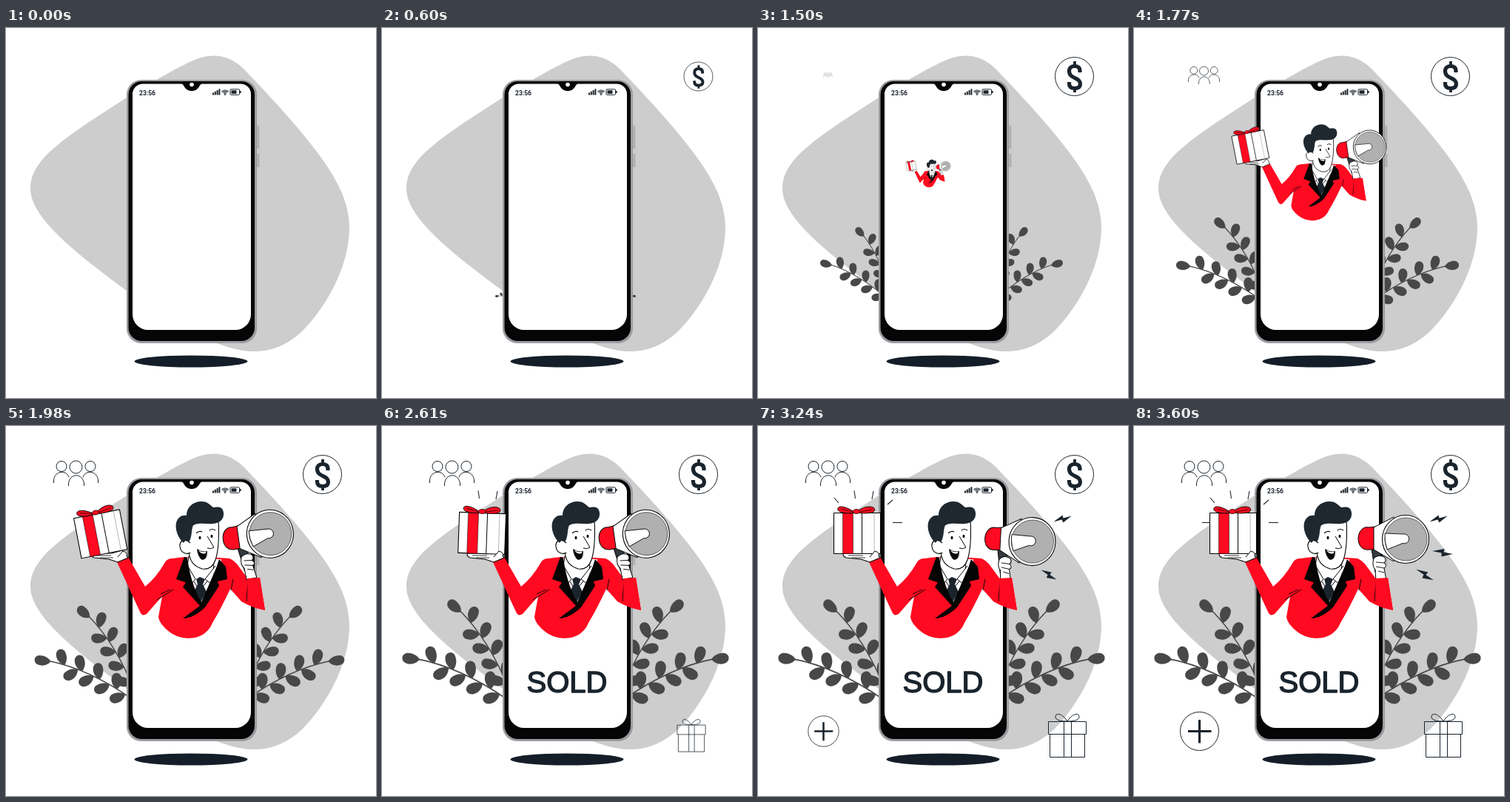
Recreate the animation shown at these times as an HTML page with a canvas. Size 500 px wide and 500 px high, loop 4.53 s.

```html
<!DOCTYPE html>
<html lang="en">
<head>
<meta charset="utf-8">
<title>Sold</title>
<style>
html, body { margin: 0; width: 100%; height: 100%; overflow: hidden; background: #fff; }
canvas { display: block; width: 500px; height: 500px; }
</style>
</head>
<body>
<canvas id="stage" width="500" height="500"></canvas>
<script>
const ctx = document.getElementById('stage').getContext('2d');
const LOOP = 4530, STEP = 30, FIRST = 210, LAST = 3600;
const INK = '#1a242d', BLACK = '#050505', HAIR = '#1f282f', RED = '#ff0a20', GREY = '#cdcdcd', LEAF = '#484848';

const ramp = (t, start, end) => Math.min(1, Math.max(0, (t - start) / (end - start)));
const ease = p => p * p * (3 - 2 * p);

// Eased value from [time, value] pairs.
function track(t, keys) {
  if (t <= keys[0][0]) return keys[0][1];
  for (let i = 1; i < keys.length; i++) {
    const [t0, v0] = keys[i - 1], [t1, v1] = keys[i];
    if (t <= t1) return v0 + (v1 - v0) * ease((t - t0) / (t1 - t0));
  }
  return keys[keys.length - 1][1];
}

function paint(d, fill, stroke, width = 1) {
  const p = d instanceof Path2D ? d : new Path2D(d);
  if (fill) { ctx.fillStyle = fill; ctx.fill(p); }
  if (stroke) { ctx.strokeStyle = stroke; ctx.lineWidth = width; ctx.stroke(p); }
}
function oval(x, y, rx, ry, fill, stroke, width) {
  const p = new Path2D();
  p.ellipse(x, y, rx, ry, 0, 0, Math.PI * 2);
  paint(p, fill, stroke, width);
}
function box(x, y, w, h, r, fill, stroke, width) {
  const p = new Path2D();
  p.roundRect(x, y, w, h, r);
  paint(p, fill, stroke, width);
}
function pivot(x, y, scale, degrees, draw) {
  if (scale <= 0) return;
  ctx.save();
  ctx.translate(x, y);
  ctx.rotate(degrees * Math.PI / 180);
  ctx.scale(scale, scale);
  ctx.translate(-x, -y);
  draw();
  ctx.restore();
}

function backdrop() {
  paint('M33 217C33 175 85 145 163 94C200 72 240 48 260 41C285 33 305 39 322 56C345 80 376 113 400 142' +
    'C436 186 464 225 464 270C464 325 430 380 400 410C375 434 345 441 315 435C275 427 220 396 163 355' +
    'C100 308 33 258 33 217Z', GREY);
  oval(250, 450.5, 76.5, 8, '#141e28');
}

function leaf(x, y, angle) {
  ctx.save();
  ctx.translate(x, y);
  ctx.rotate(angle);
  paint('M0 0C4 -6 11 -9 18 -7C25 -5 26 4 19 6.5C12 8 5 6 0 0Z', LEAF);
  ctx.restore();
}

// Grows to the left from the origin along a shallow parabola.
function branch() {
  const stemY = u => 18 - 0.788 * u + 0.00207 * u * u;
  const slope = u => -0.788 + 0.00414 * u;
  const heading = u => Math.atan2(slope(u), -1);
  paint(`M-22 ${stemY(22)}Q-82.5 ${stemY(22) + slope(22) * 60.5} -143 ${stemY(143)}`, null, LEAF, 1.6);
  for (let i = 0; i < 4; i++) {
    const up = 119 - 25.5 * i, down = 100 - 23 * i;
    leaf(-up, stemY(up), heading(up) + 0.95);
    leaf(-down, stemY(down), heading(down) - 0.95);
  }
  leaf(-139, stemY(139), heading(139) - 0.1);
}

function plants(t) {
  const size = ramp(t, 180, 2110);
  if (!size) return;
  const sway = track(t, [[210, -15], [720, -11], [990, -2], [1260, 11], [1500, 7], [1800, 1], [2110, 0]]);
  for (const side of [1, -1]) {
    ctx.save();
    ctx.translate(side > 0 ? 190 : 306, 367);
    ctx.scale(side * size, size);
    ctx.rotate(sway * Math.PI / 180);
    branch();
    ctx.rotate(34 * Math.PI / 180);
    ctx.scale(0.96, 0.96);
    branch();
    ctx.restore();
  }
}

function phone() {
  box(338, 132, 4.5, 31, 1, '#b2b2b4');
  box(338, 170, 4.5, 18, 1, '#b2b2b4');
  box(163, 70, 176, 356, 20, '#9b9da2');
  box(165.5, 72, 170.5, 351, 18, BLACK);
  box(171, 75.5, 160, 332.5, [14, 14, 21, 21], '#fff');
  paint('M237 75C241 76 241 85 251 85C261 85 261 76 265 75Z', BLACK);
  oval(251, 76.5, 2.8, 2.8, '#fff');

  ctx.fillStyle = INK;
  ctx.textAlign = 'left';
  ctx.font = 'bold 8.5px Roboto, sans-serif';
  ctx.fillText('23:56', 180, 90.5);
  for (let i = 0; i < 4; i++) box(279 + i * 2.8, 87.5 - i * 1.7, 2, 3 + i * 1.7, 0, INK);
  for (const r of [2.2, 4.2, 6]) {
    const arc = new Path2D();
    arc.arc(296, 90, r, Math.PI * 1.23, Math.PI * 1.77);
    paint(arc, null, INK, 1.2);
  }
  oval(296, 90, 1, 1, INK);
  box(303, 82.8, 12.5, 7.5, 1, '#fff', INK, 1);
  box(304.5, 84.3, 7, 4.5, 0, INK);
  box(316, 85, 1.6, 3, 0, INK);
}

function gift() {
  box(102.5, 117.5, 63, 55, 0, '#fff', BLACK, 1.1);
  box(114.5, 118, 14, 54.5, 0, RED, BLACK, 0.5);
  paint('M140.5 118V172', null, BLACK, 1);
  paint('M157 118V172', null, '#999', 0.7);
  paint('M131 117C120 109 110 107 108 111C106 117 119 119 131 117Z' +
    'M133 117C140 109 153 107 157 111C161 118 147 119 133 117Z', RED, BLACK, 0.9);
  paint('M112 112L128 116M155 113L138 116', null, BLACK, 0.7);
  oval(133, 115.5, 4.5, 3, RED, BLACK, 0.7);
}

function megaphone() {
  paint('M321 166L333 165L336 197L326 198Z', '#333a40', BLACK, 1);
  paint('M318 137C299 133 297 170 318 167L326 167V136Z', RED, BLACK, 1);
  paint('M324 137L351 123V183L324 167Z', '#fff', BLACK, 1);
  oval(367, 153, 31.5, 32.5, '#fff', BLACK, 1.1);
  oval(367.5, 153, 28.5, 29, '#b0b0b0', '#444', 0.8);
  paint('M339 145L364 146A6.5 6.5 0 1 1 363 158.5L342 167Q338 155 339 145Z', '#fff', BLACK, 0.9);
  paint('M324 179Q330 173 338 177Q342 181 338 185Q343 189 338 192L341 209L327 210L326 194Q321 189 324 179Z',
    '#fff', BLACK, 1);
  paint('M327 184L338 185M327 190L338 192M330 196L338 198', null, BLACK, 0.9);
}

function head() {
  paint('M247 176L244 196L262 222L280 200L281 182Z', '#fff', BLACK, 1);
  paint('M243 142L248 176Q251 189 265 193Q278 195 283 181Q289 163 287 126L262 126Z', '#fff', BLACK, 1.1);
  paint('M249 158C242 151 234 155 235 163C236 172 245 174 249 171', '#fff', BLACK, 1.1);
  paint('M240 158C233 152 228 140 230 131C232 123 238 120 244 121C244 109 254 102 264 102' +
    'C273 102 276 107 280 110C287 109 293 109 294 117C295 126 289 131 280 132C271 133 262 130 253 134' +
    'C250 140 252 150 247 157C244 154 241 155 240 158Z', HAIR);
  paint('M257 145Q261 141 265 143M275 141Q279 138 283 141', null, BLACK, 1.2);
  oval(262, 151, 1.5, 2.3, BLACK);
  oval(278, 149, 1.5, 2.3, BLACK);
  paint('M272 149L281 164Q277 167 272 165', null, BLACK, 1);
  paint('M258 166Q265 171 272 169Q272 181 265 181Q259 177 258 166Z', BLACK);
  paint('M260 168Q265 171 270 170L270 172Q264 174 260 168Z', '#fff');
}

function jacket() {
  paint('M165 177L188 217Q203 205 215 184Q218 179 225 179L241 177L288 178L302 179Q309 182 314 189L328 208' +
    'L343 205L350 249Q333 246 318 237L303 220Q291 246 279 266C269 291 239 291 222 279Q207 268 206 258' +
    'L211 230L190 254Q184 258 181 251L150 184Z', RED);
  paint('M204 235L226 221M209 227L222 221M304 222L307 207M325 237L327 210', null, BLACK, 0.9);
}
function lapels() {
  paint('M241 177L230 207L243 211.5L239 217.5L262 243L239 260Q253 260 269 245L288 216L286 210L299 207' +
    'L297 190L288 180L284 192L264 238Q250 215 245 178Z', BLACK);
}

function man(t) {
  jacket();
  paint('M242 178L262 243L288 205L291 180Z', '#fff');
  head();
  paint('M246 190L256 207L249 215M283 189L269 207L277 213', '#fff', BLACK, 1);
  paint('M257 207L262 204L269 207L266 214L271 224L262 240L253 225L259 214Z', INK);
  lapels();
  paint('M151 184L139 180L119 178Q113 175 116 172L143 172L157 168L165 178Z', '#fff', BLACK, 1.1);
  paint('M122 175H142M127 178L145 178', null, BLACK, 0.8);
  const giftTilt = track(t, [[2040, -11], [2490, 3], [2610, 2], [2850, 0]]);
  pivot(135, 178, 1, giftTilt, gift);
  paint('M151 177L158 169Q165 171 163 176', '#fff', BLACK, 1);
  const megaTilt = track(t, [[2760, -8], [3120, 4], [3240, 3], [3420, 0]]);
  pivot(310, 222, 1, megaTilt, megaphone);
  paint('M326 206L343 205L350 249L327 241Z', RED);
}

function dollar() {
  oval(427.5, 65.5, 26, 26, '#fff', INK, 1);
  paint('M435 60V58C435 53.5 432 51.5 428 51.5C423.5 51.5 420.5 54 420.5 58C420.5 64 424 65.5 428 67.5' +
    'C433 69.5 435.5 71.5 435.5 75.5C435.5 80 432.5 81.5 428 81.5C423 81.5 420.5 79 420.5 75V73', null, INK, 5.2);
  paint('M428 45V52M428 81V87', null, INK, 3.8);
}

function people() {
  oval(75, 54.5, 7, 7, null, INK);
  oval(94.5, 55.5, 8.5, 8.5, null, INK);
  oval(114, 54.5, 7, 7, null, INK);
  paint('M64.5 77V74C65 60 82 59 85 69M84.5 81V78C86 63 104 63 105.5 78V81' +
    'M104 69C107 59 124 60 124.5 74V77', null, INK);
}

function giftIcon() {
  box(392.5, 399.5, 51, 17, 0, null, INK);
  paint('M394.5 417V447.5H441.5V417M413.5 400V447M423.5 400V447', null, INK);
  paint('M418 399C411 388 402 387 402 393C402 398 410 399 418 399C426 399 434 398 434 393C434 387 425 388 418 399Z',
    null, INK);
}

function plus() {
  oval(88.5, 412.5, 26, 26, '#fff', INK, 1);
  paint('M73 412.5H104.5M88.5 397V428.5', null, INK, 3.2);
}

function sold() {
  ctx.font = '40px "Liberation Sans", Arial, sans-serif';
  ctx.textAlign = 'center';
  ctx.fillStyle = ctx.strokeStyle = INK;
  ctx.lineWidth = 1.4;
  ctx.fillText('SOLD', 250, 360);
  ctx.strokeText('SOLD', 250, 360);
}

function ray(t, start, end, x0, y0, x1, y1) {
  const p = ramp(t, start, end);
  if (p) paint(`M${x0} ${y0}L${x0 + (x1 - x0) * p} ${y0 + (y1 - y0) * p}`, null, INK, 1.1);
}
function rays(t) {
  ray(t, 2370, 2610, 131.5, 98, 130, 87.5);
  ray(t, 2370, 2610, 154, 99, 156, 88);
  ray(t, 2640, 2880, 109, 104, 103, 97);
  ray(t, 2700, 3000, 175, 106, 182, 100);
  ray(t, 2880, 3150, 182, 130.5, 195, 130.5);
  ray(t, 3430, 3600, 103, 130.5, 92, 130.5);
}

function bolt(x, y, angle, size) {
  pivot(x, y, size, angle, () => {
    ctx.translate(x, y);
    paint('M-12 4L0 -5L1 -1L12 -4L1 5L-1 1Z', INK);
  });
}
function bolts(t) {
  bolt(411.5, 125.5, 0, ramp(t, 2910, 3150));
  bolt(393, 201, 50, 1.1 * ramp(t, 2970, 3270));
  bolt(417, 171, 27, 1.1 * ramp(t, 3430, 3600));
}

function render(t) {
  ctx.fillStyle = '#fff';
  ctx.fillRect(0, 0, 500, 500);
  ctx.lineJoin = 'round';
  backdrop();
  plants(t);
  phone();
  const popIn = (x, y, start, draw) => pivot(x, y, ramp(t, start, start + 540), 0, draw);
  popIn(427.5, 65.5, 195, dollar);
  popIn(94.5, 64, 1390, people);
  popIn(227.4, 197, 1390, () => man(t));
  popIn(250, 346, 2040, sold);
  popIn(418, 418, 2205, giftIcon);
  popIn(88.5, 412.5, 2810, plus);
  rays(t);
  bolts(t);
}

const origin = performance.now();
function tick() {
  const t = (performance.now() - origin) % LOOP;
  render(t < FIRST ? 0 : Math.min(LAST, Math.floor(t / STEP) * STEP));
  requestAnimationFrame(tick);
}
tick();
</script>
</body>
</html>
```
